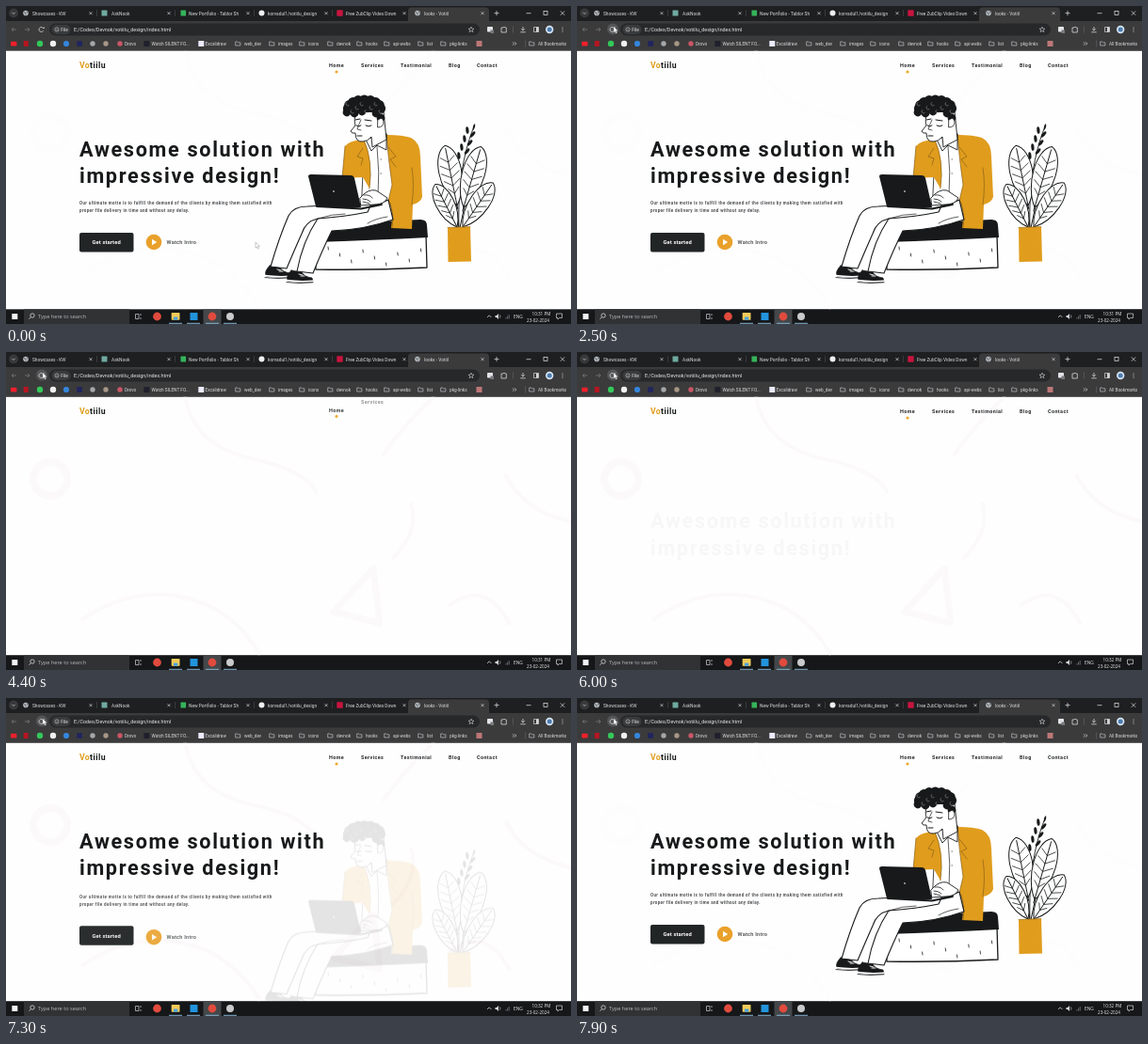
These frames come from a looping animation (600x338 px, 8 s). An HTML page with a canvas:

```html
<!DOCTYPE html>
<html lang="en">
<head>
<meta charset="utf-8">
<title>Landing page reload</title>
<style>
html, body { margin: 0; width: 100%; height: 100%; overflow: hidden; background: #fff; }
canvas { display: block; width: 600px; height: 338px; }
</style>
</head>
<body>
<canvas id="stage"></canvas>
<script>
const W = 600, H = 338, LOOP = 8000;
const PAGE_TOP = 47.5, PAGE_BOTTOM = 322.5;
const RELOAD = 2900, CLOCK_TICK = 5000;
const ORANGE = '#e09c1c', INK = '#17191a', BAR = '#3b3b3c', PALE = '#d5d6d8';
const scale = window.devicePixelRatio || 1;

function layer(canvas) {
  canvas.width = W * scale;
  canvas.height = H * scale;
  const context = canvas.getContext('2d');
  context.scale(scale, scale);
  return context;
}

const stage = layer(document.getElementById('stage'));
const artCanvas = document.createElement('canvas');
const art = layer(artCanvas);
let g = stage;

const clamp = v => Math.max(0, Math.min(1, v));
const easeOut = v => 1 - (1 - clamp(v)) ** 2;
const easeInOut = v => { v = clamp(v); return v * v * (3 - 2 * v); };

function text(str, x, y, size, color, { weight = 400, spacing = 0, font = 'Roboto' } = {}) {
  g.font = `${weight} ${size}px ${font}, sans-serif`;
  g.letterSpacing = spacing + 'px';
  g.fillStyle = color;
  g.fillText(str, x, y);
}

function rect(x, y, w, h, color, radius = 0) {
  g.fillStyle = color;
  g.beginPath();
  g.roundRect(x, y, w, h, radius);
  g.fill();
}

function disc(x, y, r, color) {
  g.fillStyle = color;
  g.beginPath();
  g.arc(x, y, r, 0, 7);
  g.fill();
}

function ring(x, y, r, color, width = 0.8, from = 0, to = 7) {
  g.strokeStyle = color;
  g.lineWidth = width;
  g.beginPath();
  g.arc(x, y, r, from, to);
  g.stroke();
}

function fill(d, color) {
  g.fillStyle = color;
  g.fill(new Path2D(d));
}

function line(d, color = INK, width = 0.8) {
  g.strokeStyle = color;
  g.lineWidth = width;
  g.stroke(new Path2D(d));
}

function shape(d, color, width = 1) {
  fill(d, color);
  line(d, INK, width);
}

function cross(x, y, r, color = PALE) {
  line(`M${x - r} ${y - r}l${2 * r} ${2 * r}M${x + r} ${y - r}l${-2 * r} ${2 * r}`, color, 0.7);
}

/* ---------- illustration ---------- */

function leaf(x, y, length, width, angle) {
  g.save();
  g.translate(x, y);
  g.rotate(angle);
  shape(`M0 0C${-width} ${-length * .3} ${-width} ${-length * .9} 0 ${-length}` +
        `C${width} ${-length * .9} ${width} ${-length * .3} 0 0Z`, '#fff', 1);
  line(`M0 4V${-length * .95}`, INK, 0.9);
  for (let k = 0.2; k < 0.85; k += 0.13) {
    const reach = width * 0.6 * Math.sin(Math.PI * k);
    line(`M${-reach} ${-length * k - 6}L0 ${-length * k}L${reach} ${-length * k - 6}`, INK, 0.7);
  }
  g.restore();
}

function drawPlant() {
  line('M481 238C480 205 482 165 497 128', INK, 0.9);
  for (let i = 0; i < 7; i++) {
    const side = i % 2 ? 1 : -1;
    g.save();
    g.translate(493.5 - i * 1.5 + side * 3.6, 132 + i * 4.5);
    g.rotate(0.3 + side * 0.4);
    g.fillStyle = INK;
    g.beginPath();
    g.ellipse(0, 0, 1.6, 3.8, 0, 0, 7);
    g.fill();
    g.restore();
  }
  fill('M496 132q-1-5 2-7q1 4-2 7Z', INK);
  line('M481 236L478 212M482 236L487 212', INK, 1);
  leaf(479, 212, 65, 16, -0.2);
  leaf(486, 214, 67, 16, 0.28);
  leaf(479, 235, 51, 13, -0.47);
  leaf(485, 235, 57, 14, 0.6);
  fill('M469 235.5L493 234.5L494 271.5L469.5 272Z', ORANGE);
  line('M469 235.5L493 234.7', '#9c6d19', 0.7);
}

function drawBench() {
  shape('M328 246L446 243L447 278Q388 281 329 280Z', '#fff', 1.3);
  fill('M327 235Q328 231 334 232L440 227Q447 227 447 233L448 246Q390 249 327 251Z', INK);
  for (let i = 0; i < 9; i++) {
    const x = 342 + i * 12.3, y = 256 + (i * 7) % 18;
    line(`M${x} ${y}l.4 3`, INK, 0.8);
  }
}

function drawShoe(x, y) {
  g.save();
  g.translate(x, y);
  shape('M5 -3L16 -1Q19 4 27 5L28 9Q14 10 1 8Q-1 3 5 -3Z', INK, 0.7);
  line('M0 7.6Q14 9.5 28 8.3', '#fff', 1.5);
  line('M0 9.6Q14 11.5 28 9.8', INK, 0.8);
  line('M13 1l4 1M15 3l4 0', '#fff', 0.9);
  g.restore();
}

function drawLegs() {
  drawShoe(275, 279);
  drawShoe(298, 284);
  shape('M406 206L411 227Q380 238 346 239Q336 259 326 284L309 282Q315 250 331 226Q336 218 350 217L395 211Z', '#fff', 1.1);
  shape('M388 210L384 219Q360 224 331 226Q318 229 314 242Q306 260 298 279L281 277Q290 246 300 223Q305 213 320 213Z', '#fff', 1.1);
  line('M331 226Q346 221 360 221M405 224Q392 226 384 231', INK, 0.7);
}

function drawBody() {
  shape('M381 141L405 137L413 205Q398 213 378 208Z', '#fff', 0.8);
  fill('M380 142Q364 143 360 149L357 183L379 182L386 194Q390 164 380 142Z', ORANGE);
  fill('M404 137Q421 137 430 140Q440 145 440 160L442 203Q440 209 432 211L431 237L409 236Q412 219 406 207L410 190Q406 162 404 137Z', ORANGE);
  line('M360 149L357 183M380 142Q390 165 386 194M404 137Q406 163 410 190L406 207M431 211Q434 190 431 172M410 236Q412 222 408 209', '#89601b', 0.7);
  line('M379 151l-6 9l6 2l-2 7M406 150l8 10l-6 3l6 8', '#89601b', 0.7);
  shape('M382 142L388 154L394 148L404 153L404 136Z', '#fff', 0.9);
  line('M394 149Q397 177 395 203M398 163h.5M398 178h.5', INK, 0.7);
}

function drawHead() {
  shape('M372 112Q369 122 371 127L366 133Q367 136 371 135Q371 145 379 144Q384 144 388 139L389 150L404 142L401 112Z', '#fff', 0.9);
  line('M371 121l5-1M381 121l7 1M372 127q3 2 5 0M382 127q3 2 6 0M373 138l5 0', INK, 1);
  line('M377 121q-3 6-4 10l4 1', INK, 0.7);
  for (let i = 0; i < 9; i++) {
    const a = Math.PI * (1 + i / 8);
    disc(380.5 + 17 * Math.cos(a), 109 + 9 * Math.sin(a), 5.6, INK);
  }
  rect(366, 101, 33, 12, INK, 5);
  [[362, 113], [370, 114], [378, 112], [393, 114], [398, 119]].forEach(([x, y]) => disc(x, y, 4.4, INK));
  for (let i = 0; i < 8; i++) ring(363 + i * 5, 104 + (i * 2 % 3) * 4, 2, '#aaa', 0.5, 1, 4);
  shape('M395 121q5-4 6 2q0 6-6 6Z', '#fff', 0.8);
}

function drawLaptop() {
  shape('M376 204Q384 194 393 196L405 204Q402 211 391 211L377 212Z', '#fff', 0.9);
  line('M380 201q6-1 9 3M379 205q5 0 8 3M379 208l7 2', INK, 0.8);
  fill('M321 181Q321 179 324 179L366 180Q369 180 370 183L377 214Q365 216 329 213Z', INK);
  line('M330 213L377 215.5L399 211', INK, 1.8);
  disc(348, 197, 1, '#aaa');
}

g = art;
g.lineJoin = g.lineCap = 'round';
drawPlant();
drawBench();
drawBody();
drawLegs();
drawHead();
drawLaptop();
g = stage;

/* ---------- web page ---------- */

const NAV = [['Home', 343], ['Services', 377], ['Testimonial', 419], ['Blog', 470], ['Contact', 500]];

function appear(progress, shift, draw) {
  if (progress <= 0) return;
  g.save();
  g.globalAlpha = progress;
  g.translate(0, shift * (1 - progress));
  draw();
  g.restore();
}

function backdrop(t) {
  const tint = t < RELOAD || t > 7600 ? '#fefdfe' : '#fcf9fb';
  ring(47, 135, 18, tint, 8);
  g.lineJoin = 'round';
  line('M390 230L348 276L397 288Z', tint, 7);
  line('M190 47Q200 100 260 113T330 150M400 110Q420 80 455 47M410 220Q440 190 430 160M530 130Q550 170 600 180M470 270Q510 240 535 290M80 285Q130 250 185 260T270 322', tint, 4);
}

function logo() {
  text('Vo', 78, 66.2, 8.7, ORANGE, { weight: 700, spacing: 0.3 });
  text('tiilu', 89, 66.2, 8.7, INK, { weight: 700, spacing: 0.5 });
}

function navItem(i) {
  text(NAV[i][0], NAV[i][1], 65.3, 5.4, '#27292b', { weight: 700, spacing: 0.42 });
  if (i === 0) disc(351, 70, 1.6, '#eda92c');
}

function headline() {
  const style = { weight: 700, spacing: 1.65 };
  text('Awesome solution with', 78, 160.3, 21.7, INK, style);
  text('impressive design!', 78, 188.4, 21.7, INK, style);
}

function paragraph() {
  const style = { weight: 600, spacing: 0.35 };
  text('Our ultimate motte is to fulfill the demand of the clients by making them satisfied with', 78, 211.2, 4.5, '#4c4e51', style);
  text('proper file delivery in time and without any delay.', 78, 218.8, 4.5, '#4c4e51', style);
}

function button() {
  rect(78, 241, 57.5, 20.5, '#222526', 2);
  text('Get started', 91.5, 253.2, 5.8, '#fff', { weight: 700, spacing: 0.1 });
}

function watchIntro() {
  disc(157, 251, 8.3, '#e9a12b');
  fill('M155 247.7L160.2 251L155 254.3Z', '#fff');
  text('Watch Intro', 170.5, 253.1, 5.7, '#3e4144', { weight: 500, spacing: 0.22 });
}

function drawPage(t) {
  const height = PAGE_BOTTOM - PAGE_TOP;
  g.save();
  g.beginPath();
  g.rect(0, PAGE_TOP, W, height);
  g.clip();
  rect(0, PAGE_TOP, W, height, '#fefefe');
  backdrop(t);
  // Before the reload every part stands finished.
  const part = (start, length) => t < RELOAD ? 1 : easeOut((t - start) / length);
  appear(part(3600, 700), -20, logo);
  NAV.forEach((_, i) => appear(part(3900 + i * 300, 700), -20, () => navItem(i)));
  appear(part(5980, 1300), 28, headline);
  appear(part(6540, 1000), 30, paragraph);
  const leaving = t >= RELOAD && t < 4000;
  appear(leaving ? 1 - easeInOut((t - RELOAD) / 800 - 0.1) : part(6710, 750), 30, button);
  appear(part(6730, 850), 30, watchIntro);
  appear(part(7265, 640), 40, () => g.drawImage(artCanvas, 0, 0, W, H));
  g.restore();
}

/* ---------- browser ---------- */

function globe(x, y) {
  disc(x, y, 2.8, '#b9bec4');
  line(`M${x - 2} ${y - 1}l2 1l0 2M${x + 1} ${y - 2}l1 2`, '#4a4d50', 0.8);
}

function folder(x, y, color = '#bfc1c4') {
  line(`M${x - 2.5} ${y + 2}v-4h2l.8 .8h2.4v3.2Z`, color, 0.7);
}

function drawTabs(loading) {
  rect(0, 0, W, 19, '#1e1f20');
  rect(427, 1.5, 86, 20, BAR, 4);
  disc(8, 7.5, 5, '#38393b');
  line('M6.3 6.8l1.7 1.7l1.7-1.7', PALE, 0.7);
  const tabs = [
    ['Showcases - KW', 28, 90], ['AskNook', 112, 173], ['New Portfolio - Tablor Sh', 194, 257],
    ['korvadul1/votiilu_design', 278, 340], ['Free ZubClip Video Down', 361, 423], ['looks - Votiil', 444, 506]
  ];
  tabs.forEach(([name, x, close], i) => {
    text(name, x, 9.6, 4.8, '#dddee0');
    cross(close, 7.7, 1.5);
    if (i < 4) rect(close + 6.5, 4, 0.5, 7, '#55575a');
  });
  globe(21, 7.5);
  rect(101.5, 4.6, 6, 6, '#6faaa0', 0.6);
  rect(185.5, 4.6, 5.6, 6, '#35b45a', 0.6);
  disc(271.5, 7.5, 3, '#f0f0f0');
  rect(351.3, 4.3, 6.4, 6.4, '#c8143f', 0.6);
  if (loading) ring(437, 7.5, 2.7, '#8ab4f8', 0.9, 0, 4);
  else globe(437, 7.5);
  line('M518.5 7.6h5M521 5.1v5M552.5 7.7h5M588.8 5.4l4.4 4.4M593.2 5.4l-4.4 4.4', '#e8e8e8', 0.7);
  g.strokeRect(571, 5.5, 4, 4);
}

function drawToolbar(hover, loading) {
  rect(0, 16, W, PAGE_TOP - 16, BAR);
  line('M11 25h-5m2-2l-2 2l2 2M20 25h5m-2-2l2 2l-2 2', '#77797b', 0.8);
  if (hover) disc(38, 24.5, 6, '#555658');
  if (loading) cross(37.5, 25, 2);
  else {
    ring(37.5, 25, 2.5, PALE, 0.8, 0.5, 5.6);
    fill('M38.7 24h2v-2Z', PALE);
  }
  rect(46, 18.5, 457, 13, '#27282a', 6.5);
  rect(48.5, 20, 20, 10, '#3a3b3d', 5);
  ring(54, 25, 2.1, PALE, 0.6);
  line('M54 24.7v1.3', PALE, 0.6);
  text('File', 58.3, 26.7, 4.8, '#e4e5e6');
  text('E:/Codes/Devnok/votiilu_design/index.html', 72, 26.8, 5.35, '#e8e9ea');
  line('M494 22.2l.9 2h2l-1.6 1.3l.6 2.1l-1.9-1.2l-1.9 1.2l.6-2.1l-1.6-1.3h2Z', PALE, 0.6);
  rect(511, 22, 6, 5.5, '#e2e4e8', 0.8);
  rect(514.5, 25.5, 3.5, 3.5, '#77797c');
  line('M526 23h2q1-2 2 0h1.3v5h-5.3Z', PALE, 0.8);
  rect(538, 21.5, 0.6, 7, '#66696c');
  line('M549 22v4m-1.8-1.7l1.8 1.8l1.8-1.8M546.3 27.8h5.4', PALE, 0.8);
  line('M560.5 22.5h5v5h-5Z', PALE, 0.7);
  rect(563, 22.5, 2.5, 5, PALE);
  disc(577.2, 25, 4.2, '#d9e6f5');
  disc(577.2, 25, 2.5, '#4d7cae');
  for (let i = -1; i < 2; i++) disc(591, 25 + i * 2, 0.6, PALE);
}

function drawBookmarks() {
  rect(5, 37.8, 6.4, 4.6, '#f0202b', 1);
  rect(18.7, 37, 5, 6, '#b61521');
  disc(36, 40, 3.2, '#34c85a');
  disc(50, 40, 3.2, '#f1f1f1');
  disc(64, 40, 3.1, '#3486dd');
  rect(75.3, 37.2, 5.6, 5.6, '#20245f');
  disc(92, 40, 2.7, '#a5a8aa');
  disc(106, 40, 2.7, '#a79786');
  disc(121, 40, 2.7, '#cb5667');
  rect(146.4, 37.1, 6, 6, '#20202c');
  rect(204.3, 37, 6, 6, '#ecebff', 0.6);
  rect(499.5, 37, 6, 6, '#bd7777');
  const labels = [['Drovo', 126], ['Watch SILENT FO...', 154.5], ['Excalidraw', 211.5]];
  const folders = [['web_dev', 253], ['images', 289], ['icons', 321], ['devnok', 351], ['hooks', 382],
    ['api-webs', 411], ['list', 447], ['pkg-links', 471], ['All Bookmarks', 565]];
  labels.concat(folders).forEach(([name, x]) => text(name, x, 41.7, 4.7, '#dcdddf'));
  folders.forEach(([, x]) => folder(x - 6.8, 40));
  line('M538 38.3l1.6 1.7l-1.6 1.7M540.3 38.3l1.6 1.7l-1.6 1.7', PALE, 0.7);
  rect(551.5, 36.5, 0.6, 7, '#66696c');
}

/* ---------- taskbar and pointer ---------- */

function drawTaskbar(t) {
  rect(0, PAGE_BOTTOM, W, H - PAGE_BOTTOM, '#151719');
  rect(6.3, 327, 6, 6, '#f4f4f4');
  rect(19, PAGE_BOTTOM, 112, H - PAGE_BOTTOM, '#303234');
  ring(28, 329, 2.2, PALE, 0.8);
  line('M26.4 330.7l-2 2', PALE, 0.8);
  text('Type here to search', 34, 332, 5.6, '#b9bbbd', { font: '"Open Sans"' });
  line('M137.5 327.5h3.5v5h-3.5ZM143 327v2M143 331v2', PALE, 0.7);
  rect(209.5, PAGE_BOTTOM, 19, H - PAGE_BOTTOM, '#44484a');
  disc(160.5, 330, 4.4, '#e14b3e');
  rect(175.7, 326, 8.8, 7.7, '#f3cb59', 0.6);
  rect(178, 330.5, 4.3, 3.2, '#4aa4d9');
  rect(195.5, 326, 8, 8, '#2294dc');
  disc(219, 330, 4.4, '#e14b3e');
  disc(238, 330, 4, '#c9cacb');
  [180, 199, 219, 238].forEach(x => rect(x - 7, 336.8, 14, 1, '#86b4d1'));
  line('M511 331l2.2-2.2l2.2 2.2', PALE, 0.8);
  fill('M519.5 329h1.5l2-2v6l-2-2h-1.5Z', PALE);
  ring(522.5, 330, 2.4, PALE, 0.6, -0.8, 0.8);
  line('M531 332.5v-1.5M532.6 332.5v-3M534.2 332.5v-4.5', '#7c7e80', 0.8);
  const style = { font: '"Open Sans"' };
  text('ENG', 539, 332, 4.8, '#eee', style);
  text(t < CLOCK_TICK ? '10:31 PM' : '10:32 PM', 558.5, 328.5, 4.6, '#f0f0f0', style);
  text('23-02-2024', 553, 335.7, 4.6, '#f0f0f0', style);
  line('M584.5 327h6v4.5h-3l-1.5 1.6v-1.6h-1.5Z', PALE, 0.7);
}

function drawPointer(t) {
  const travel = easeInOut((t - 120) / 850);
  const settle = easeInOut((t - 1300) / 350);
  g.save();
  g.translate(265 - 226 * travel, 251 - 234.5 * travel + 5.5 * settle);
  fill('M0 0V6.2L1.4 5L2.5 7.2L3.5 6.7L2.5 4.6H4.4Z', '#fff');
  line('M0 0V6.2L1.4 5L2.5 7.2L3.5 6.7L2.5 4.6H4.4Z', '#8a8a8a', 0.45);
  g.restore();
}

function frame(now) {
  const t = now % LOOP;
  const loading = t >= 2650 && t < RELOAD;
  drawPage(t);
  drawTabs(loading);
  drawToolbar(t >= 1700, loading);
  drawBookmarks();
  drawTaskbar(t);
  drawPointer(t);
  requestAnimationFrame(next => frame(next - start));
}

const start = performance.now();
frame(0);
</script>
</body>
</html>
```
